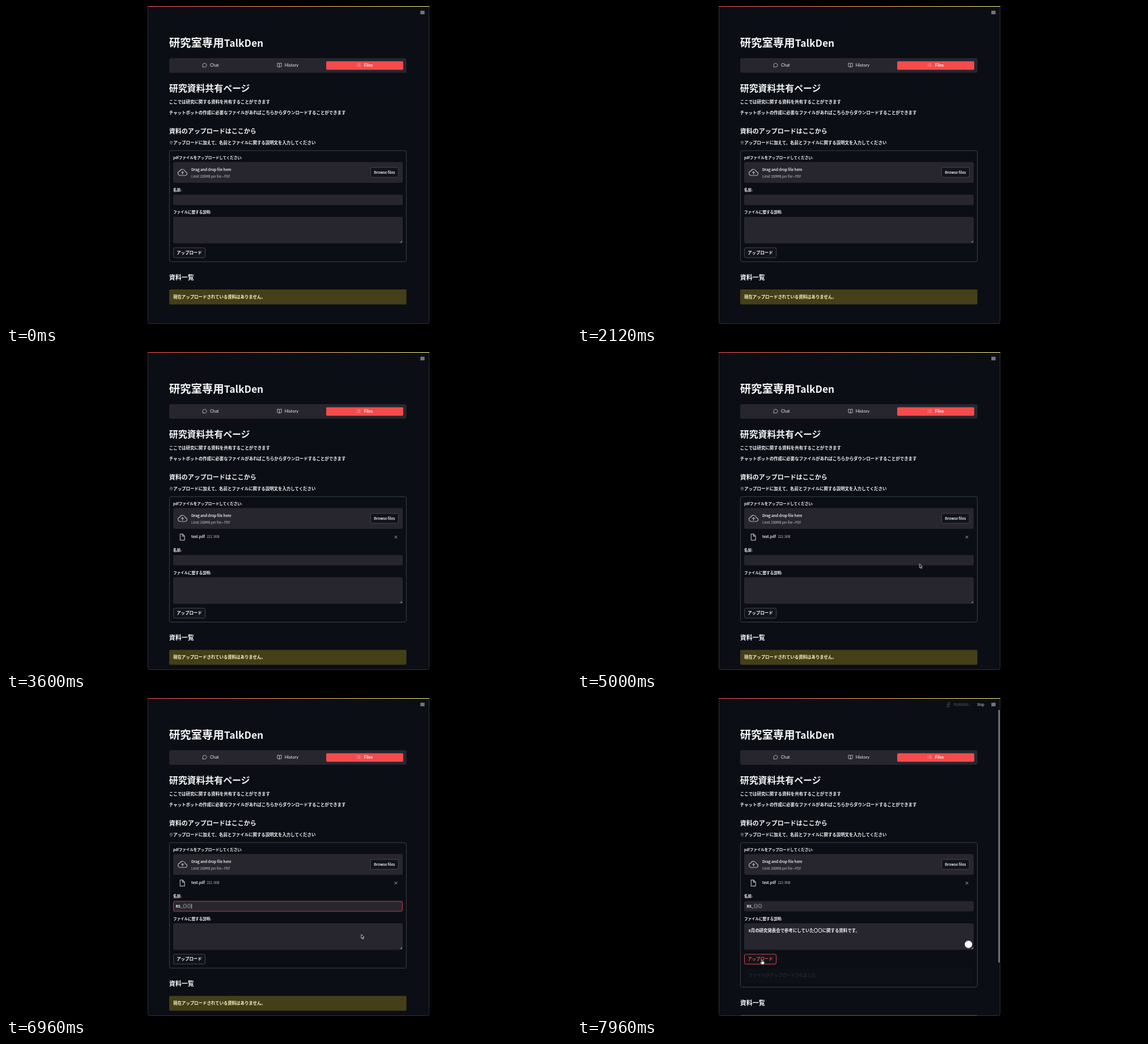
Animation of 997x561 px, one loop 8000 ms. Source, as an HTML page:

```html
<!DOCTYPE html>
<html lang="ja">
<head>
<meta charset="utf-8">
<title>資料共有ページ</title>
<style>
html, body { margin: 0; width: 100%; height: 100%; overflow: hidden; background: #000; }
svg { display: block; width: 100%; height: 100%; }
text { font: 700 7.43px "Noto Sans CJK JP", "Noto Sans CJK", sans-serif; fill: #f4f5f6; }
text.h1 { font-size: 19.4px; }
text.h2 { font-size: 15.9px; }
text.h3 { font-size: 11px; }
text.label { font-size: 6.5px; }
text.en { font-weight: 400; font-size: 6.65px; stroke: #f4f5f6; stroke-width: .2px; }
text.small { font-weight: 400; font-size: 5.8px; fill: #a9aab0; stroke: #a9aab0; stroke-width: .12px; }
text.tab { font: 400 7.5px Lato, sans-serif; }
text.tab.on { font-weight: 700; fill: #fff; }
.mid { text-anchor: middle; }
.field { fill: #27262f; }
.btn { fill: #11141a; stroke: #4a4c53; stroke-width: .9px; }
.line { fill: none; stroke: #d5d6d9; stroke-width: .8px; stroke-linecap: round; stroke-linejoin: round; }
.gray { stroke: #b4b5ba; stroke-width: 1.2px; }
.focus { fill: none; stroke: #d8444a; stroke-width: .9px; }

/* one shared 8 s clock */
.a { animation: 8s step-end infinite; }
.smooth { animation-timing-function: linear; }
#form { animation-name: form; }
#low { animation-name: low; }
#tail { animation-name: tail; }
#file { animation-name: file; }
#thumb { animation-name: thumb, thumbSize; animation-timing-function: linear, step-end; animation-duration: 8s; animation-iteration-count: infinite; }
#nameFocus, #caret { animation-name: nameFocus; }
#typed { animation-name: typed; }
#noteFocus { animation-name: noteFocus; }
#badge { animation-name: badge; }
#note { animation-name: note; }
#hot { animation-name: hot; }
#done, #run { animation-name: done; }
#mouse { animation-name: mouse; animation-timing-function: ease-in-out; }
#arrow { animation-name: arrow; }
#hand { animation-name: hand; }

@keyframes form { 0% { height: 196px } 37.5% { height: 221.4px } 98.5%, 100% { height: 255px } }
@keyframes low { 0% { transform: none } 37.5%, 100% { transform: translateY(25.4px) } }
@keyframes tail { 0% { transform: none } 98.5%, 100% { transform: translateY(33.6px) } }
@keyframes file { 0% { opacity: 0 } 37.5%, 100% { opacity: 1 } }
@keyframes thumb {
  0%, 33.99% { opacity: 0 } 34%, 40.5% { opacity: 1 } 43.5%, 98.49% { opacity: 0 } 98.5%, 100% { opacity: 1 }
}
@keyframes thumbSize { 0% { height: 492px } 37.5% { height: 472px } 98.5%, 100% { height: 446px } }
@keyframes nameFocus { 0% { opacity: 0 } 65% { opacity: 1 } 88%, 100% { opacity: 0 } }
@keyframes typed {
  0% { transform: none } 69.5% { transform: translateX(5px) } 70.5% { transform: translateX(9px) }
  71.5% { transform: translateX(12.8px) } 73.5% { transform: translateX(20.3px) } 75%, 100% { transform: translateX(28px) }
}
@keyframes noteFocus { 0% { opacity: 0 } 88% { opacity: 1 } 97.5%, 100% { opacity: 0 } }
@keyframes badge { 0% { opacity: 0 } 88%, 100% { opacity: 1 } }
@keyframes note { 0% { opacity: 0 } 90.5%, 100% { opacity: 1 } }
@keyframes hot { 0% { opacity: 0 } 96%, 100% { opacity: 1 } }
@keyframes done { 0% { opacity: 0 } 98.5%, 100% { opacity: 1 } }
@keyframes mouse {
  0%, 30% { transform: translate(744px, 318px) }
  35.5%, 40% { transform: translate(589.6px, 302px) }
  44.5% { transform: translate(744px, 330px) }
  59% { transform: translate(744px, 400px) }
  62%, 83% { transform: translate(604.4px, 373.6px) }
  86.5%, 93% { transform: translate(627px, 417px) }
  96.5%, 100% { transform: translate(326.5px, 461px) }
}
@keyframes arrow {
  0% { opacity: 0 } 30% { opacity: 1 } 44.5% { opacity: 0 } 59% { opacity: 1 }
  69.5% { opacity: 0 } 82.5% { opacity: 1 } 96%, 100% { opacity: 0 }
}
@keyframes hand { 0% { opacity: 0 } 96%, 100% { opacity: 1 } }
</style>
</head>
<body>
<svg viewBox="0 0 997 561" preserveAspectRatio="none">
  <defs>
    <linearGradient id="bar">
      <stop offset="0" stop-color="#f3484b"/><stop offset="1" stop-color="#f5ee7c"/>
    </linearGradient>
    <clipPath id="win"><path d="M250 0H747V557q0 4-4 4H254q-4 0-4-4z"/></clipPath>
  </defs>
  <rect width="997" height="561"/>
  <g clip-path="url(#win)">
    <rect x="250" width="497" height="561" fill="#0b0e15"/>

    <text class="h1" x="287.7" y="72.2">研究室専用<tspan font-size="17.4">TalkDen</tspan></text>

    <rect class="field" x="288" y="92" width="418.6" height="25.7" rx="3"/>
    <rect x="565" y="97.4" width="136" height="15.2" rx="2" fill="#f44b4d"/>
    <path class="line" d="M348 107.4l-1 .4.4-1.6a3.5 3.4 0 1 1 1.6 1.4z"/>
    <path class="line" d="M482.5 101.6v6.2M482.5 101.6q-1-.8-3.6-.8v6.1q2.6 0 3.6.9 1-.9 3.6-.9v-6.1q-2.6 0-3.6.8"/>
    <path class="line" stroke-opacity=".75" d="M619 101.8h.5M619 104.1h.5M619 106.4h.5M621.3 101.8h4M621.3 104.1h4M621.3 106.4h4"/>
    <text class="tab" x="360" y="107">Chat</text>
    <text class="tab" x="491.8" y="107">History</text>
    <text class="tab on" x="631.7" y="107">Files</text>

    <text class="h2" x="287.8" y="151.2">研究資料共有ページ</text>
    <text x="287.8" y="171.5">ここでは研究に関する資料を共有することができます</text>
    <text x="287.8" y="190.5">チャットボットの作成に必要なファイルがあればこちらからダウンロードすることができます</text>
    <text class="h3" x="287.8" y="225.2">資料のアップロードはここから</text>
    <text x="287.8" y="243.8">※アップロードに加えて、名前とファイルに関する説明文を入力してください</text>

    <rect id="form" class="a" x="288.4" y="255.1" width="418" height="196" rx="3" fill="none" stroke="#45474d" stroke-width=".9"/>
    <text class="label" x="295" y="269.8"><tspan font-size="5.8">pdf</tspan>ファイルをアップロードしてください<tspan font-size="5.8">:</tspan></text>
    <rect class="field" x="295" y="275.3" width="405" height="36.8" rx="3"/>
    <path class="line gray" d="M307 299h9a3.3 3.3 0 0 0 .4-6.6a5.1 5.1 0 0 0-9.7-1.1a3.9 3.9 0 0 0 .3 7.7zM311.5 296.6v-4.4M309.7 293.9l1.8-1.8 1.8 1.8"/>
    <text class="en" x="327" y="290.7">Drag and drop file here</text>
    <text class="small" x="327" y="302.7">Limit 200MB per file • PDF</text>
    <rect class="btn" x="643.4" y="284.8" width="49" height="17.4" rx="2.5"/>
    <text class="en mid" x="667.9" y="296">Browse files</text>

    <g id="file" class="a">
      <path class="line gray" d="M307.3 321.2h4.4l3.4 3.4v7.2h-7.8zM311.4 321.4v3.5h3.5"/>
      <text class="en" x="327" y="328.2">test.pdf</text>
      <text class="small" x="354.4" y="328.2">222.1KB</text>
      <path class="line" stroke-width="1" d="M685.9 324.4l4.2 4.2M690.1 324.4l-4.2 4.2"/>
    </g>

    <g id="low" class="a">
      <text class="label" x="295" y="327.1">名前<tspan font-size="5.8">:</tspan></text>
      <rect class="field" x="295" y="332.8" width="405" height="18.4" rx="3"/>
      <text x="299.5" y="344.4"><tspan font-size="6.65">R5_</tspan>◎◎</text>
      <g id="typed" class="a">
        <rect class="field" x="299.3" y="335" width="36" height="14"/>
        <rect id="caret" class="a" x="299.4" y="337.6" width=".7" height="8.8" fill="#fff"/>
      </g>
      <rect id="nameFocus" class="focus a" x="295.4" y="333.2" width="404.2" height="17.7" rx="2.7"/>

      <text class="label" x="295" y="366.3">ファイルに関する説明<tspan font-size="5.8">:</tspan></text>
      <rect class="field" x="295" y="372" width="405" height="46.8" rx="3"/>
      <path class="line" stroke-width=".5" d="M696.4 417l2.2-2.2M698 417l.6-.6"/>
      <rect id="noteFocus" class="focus a" x="295.4" y="372.4" width="404.2" height="46" rx="2.7"/>
      <text id="note" class="a" x="302.8" y="387.4"><tspan font-size="6.65">8</tspan>月の研究発表会で参考にしていた〇〇に関する資料です。</text>
      <circle id="badge" class="a" cx="690.8" cy="409.2" r="6.5" fill="#fff"/>

      <rect class="btn" x="295.5" y="426.6" width="56" height="17.4" rx="2.5"/>
      <text class="mid" x="323.4" y="437.7">アップロード</text>
      <g id="hot" class="a">
        <rect class="btn" x="295.5" y="426.6" width="56" height="17.4" rx="2.5" style="stroke:#f04a4d"/>
        <text class="mid" x="323.4" y="437.7" style="fill:#f04a4d">アップロード</text>
      </g>

      <g id="done" class="a">
        <rect x="295" y="451" width="405" height="26.5" rx="2" fill="#0d1117"/>
        <text x="302.8" y="466.9" style="fill:#25282d">ファイルがアップロードされました</text>
      </g>

      <g id="tail" class="a">
        <text class="h3" x="287.8" y="482.7">資料一覧</text>
        <rect x="288" y="500" width="418.6" height="26.4" rx="2" fill="#443f19"/>
        <text x="295" y="515.6" style="fill:#fbf8c4">現在アップロードされている資料はありません。</text>
      </g>
    </g>

    <g id="run" class="a">
      <g class="line" style="stroke:#5d5f65">
        <circle cx="657" cy="8.1" r=".6"/>
        <path d="M656 10l-1.2 3 1.7 1.4.2 2.2M654.8 13l-.8 2.2-2 .2M653 11.9l.7-1.7 2.3-.2 1 1.5 1.6.4"/>
      </g>
      <text class="small" x="665" y="13.8" style="fill:#5d5f65;stroke:none">RUNNING...</text>
      <text class="small" x="706" y="13.8" style="fill:#c9cacd">Stop</text>
    </g>
    <path d="M731.2 9.3h7.4M731.2 11.5h7.4M731.2 13.7h7.4" stroke="#e6e7e9"/>
    <rect id="thumb" x="743.4" y="21" width="2.8" height="492" rx="1.4" fill="#77787c"/>
    <rect x="250.5" y="-8" width="496" height="568.5" rx="4" fill="none" stroke="#34363b" stroke-width=".9"/>
    <rect x="250" width="497" height="1.1" fill="url(#bar)"/>

    <g id="mouse" class="a" fill="#0a0a0c" stroke="#f2f2f2" stroke-width=".8" stroke-linejoin="round">
      <path id="arrow" class="a" d="M0 0v7.1l1.6-1.5 1.1 2.7 1.3-.6-1.1-2.5h2.2z"/>
      <path id="hand" class="a" fill="#f4f4f4" stroke="#17181c" stroke-width=".4" d="M-.8 .4q.7-.8 1.4 0v3l2.5.5q1.2.3 1.1 1.5l-.7 3.5h-4.2l-2.4-3.4q0-1.1 1.2-.7l1.1.9z"/>
    </g>
  </g>
</svg>
</body>
</html>
```
